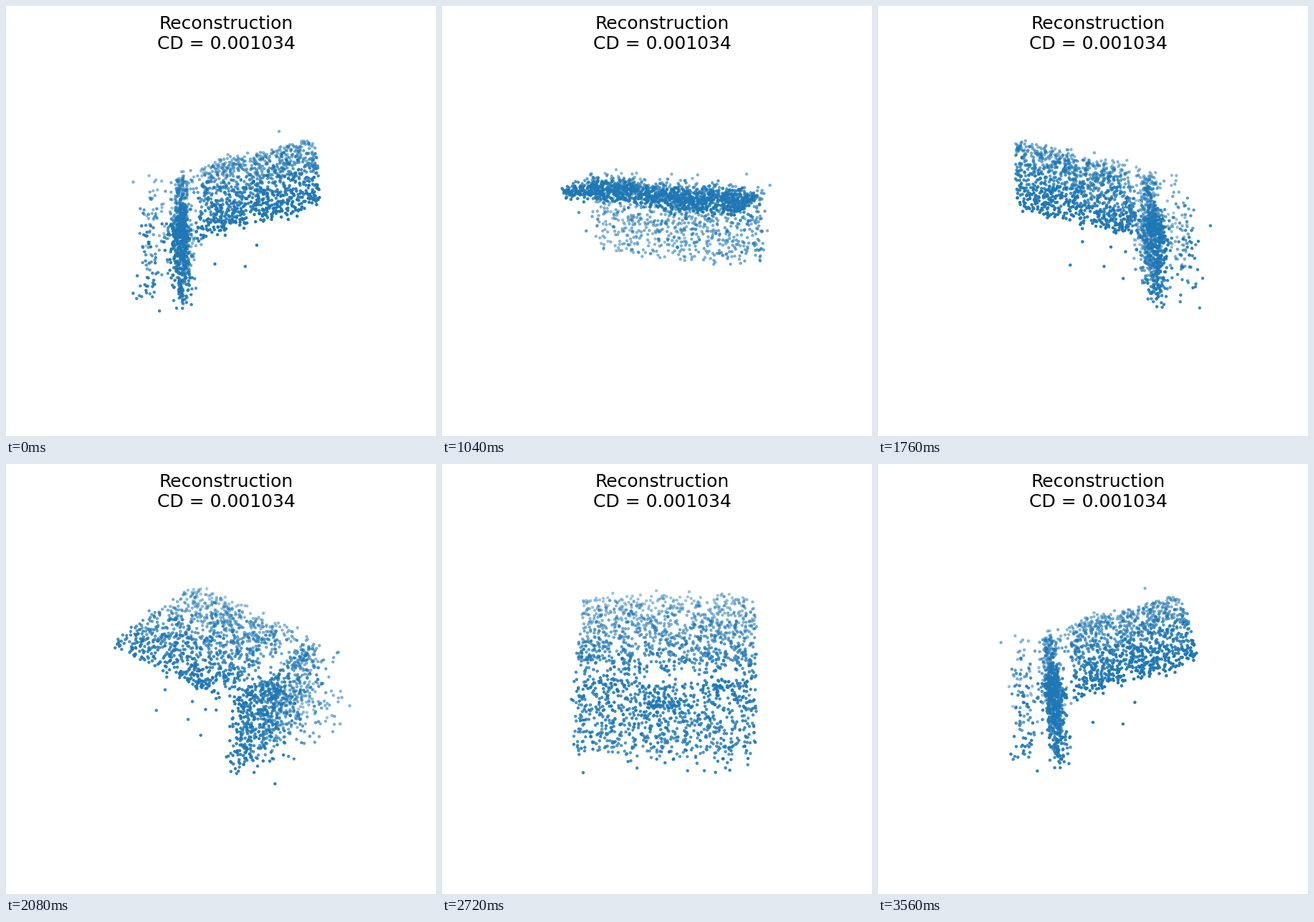
Write a matplotlib script that moves like this. It is 600 px wide and 600 px high and loops after 3600 ms.

```python
import numpy as np
import matplotlib.pyplot as plt
from matplotlib.animation import FuncAnimation

SIZE = 600
FRAMES = 90
HALF = 137.4   # half box side: one data unit is one pixel at the box centre
WIDTH = 123    # half width of both panels
rng = np.random.default_rng(12)


def spread(n, lo, hi):
    return rng.uniform(lo, hi, n)


def noise(n, sigma):
    return rng.normal(0, sigma, n)


def with_tail(n, sigma, wide, share):
    """Gaussian noise with a small share of wider deviations."""
    return noise(n, 1) * np.where(rng.random(n) < share, wide, sigma)


def tilt_height(y):
    return 40 + 0.278 * y


def tilted_panel(n=1090):
    x = spread(n, -WIDTH, WIDTH)
    back = 122 - 12 * (x / WIDTH) ** 4
    front = np.where(rng.random(n) < 0.08, -66, -43)
    y = front + rng.random(n) * (back - front)
    z = tilt_height(y) + with_tail(n, 5, 11, 0.08)
    return np.column_stack([x + noise(n, 2), y + noise(n, 3), z])


def upright_panel(n=650, core=90, corner=38):
    x = spread(n, -WIDTH, WIDTH)
    z = -91 + 5 * (x / WIDTH) ** 2 + rng.random(n) * 112
    # denser in the middle and at both top corners
    x = np.concatenate([x, noise(core, 24), noise(corner, 15) - 80,
                        noise(corner, 15) + 80])
    z = np.concatenate([z, noise(core, 11) - 16, noise(2 * corner, 5) + 19])
    m = len(x)
    y = -69 - 0.06 * (z + 35) + with_tail(m, 6, 11, 0.18)
    return np.column_stack([x + noise(m, 2), y, z + noise(m, 1.5)])


def sparse_layer(n=105):
    y = -113 + with_tail(n, 8, 14, 0.3)
    return np.column_stack([spread(n, -WIDTH, WIDTH), y, spread(n, -91, 24)])


def strays(n=9):
    """Single points hanging below the side edges of the tilted panel."""
    x = 116 * rng.choice([-1, 1], n) + noise(n, 3)
    y = spread(n, -42, 65)
    return np.column_stack([x, y, tilt_height(y) - spread(n, 20, 75)])


cloud = np.vstack([tilted_panel(), upright_panel(), sparse_layer(), strays()])

fig = plt.figure(figsize=(6, 6), dpi=100, facecolor="white")
ax = fig.add_subplot(projection="3d")
ax.set_axis_off()
ax.set_box_aspect((1, 1, 1))
ax.scatter(*cloud.T, s=5, color="#1f77b4")
ax.set(xlim=(-HALF, HALF), ylim=(-HALF, HALF), zlim=(-HALF, HALF))

for label, baseline in (("Reconstruction", 32), ("CD = 0.001034", 60)):
    fig.text(307.5 / SIZE, 1 - baseline / SIZE, label, fontsize=18,
             family="DejaVu Sans", ha="center", va="baseline")


def update(i):
    ax.view_init(elev=23, azim=i * 360 / FRAMES)
    return ax.collections


anim = FuncAnimation(fig, update, frames=FRAMES, interval=40, repeat=True,
                     repeat_delay=0)
plt.show()
```
